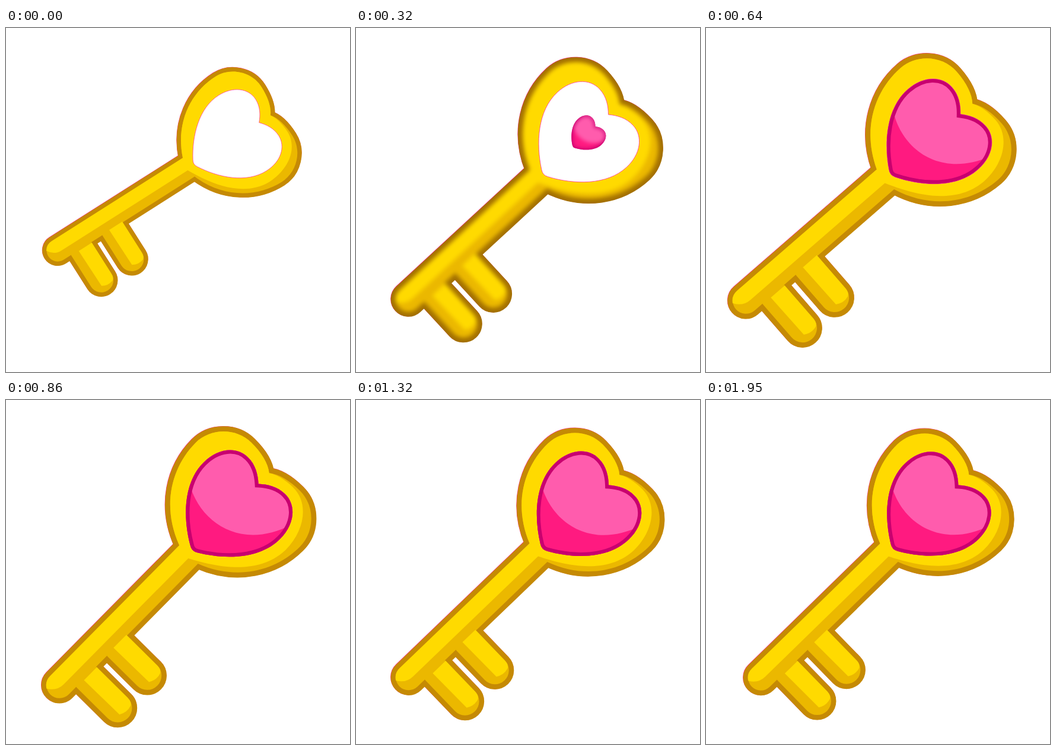
These frames come from a looping animation (580x580 px, 1990 ms). An HTML page:

```html
<!DOCTYPE html>
<html lang="en">
<head>
<meta charset="utf-8">
<title>Heart key</title>
<style>
  html, body { margin: 0; width: 100%; height: 100%; overflow: hidden; background: #fff; }
  svg { display: block; width: 580px; height: 580px; }
</style>
</head>
<body>
<svg viewBox="0 0 580 580">
  <defs>
    <!-- The key lies along the x axis, with its tail end near the origin. -->
    <g id="body">
      <rect x="-25.5" y="-21.5" width="350" height="43" rx="21.5"/>
      <rect x="13" width="47" height="118" rx="23.5"/>
      <rect x="85" width="47" height="115" rx="23.5"/>
      <path d="M298 22C323 87 379 121 436 121C470 121 501 92 501 56C501 32 496 12 486 0
        C496 -12 501 -32 501 -56C501 -92 470 -121 436 -121C379 -121 323 -87 298 -22Z"/>
    </g>
    <path id="heart" d="M310 8C334 49 375 89 422 89C456 89 480 69 480 43C480 25 471 11 461 0
      C471 -11 480 -25 480 -43C480 -69 456 -89 422 -89C375 -89 334 -49 310 -8Q305 0 310 8Z"/>
    <clipPath id="inHeart"><use href="#heart"/></clipPath>
  </defs>
  <g id="key">
    <use href="#body" y="-.6" fill="#ff2a9a" stroke="#ff2a9a" stroke-width="17"/>
    <use id="rim" href="#body" stroke-width="17"/>
    <g id="gold">
      <use href="#body" fill="#ebb800"/>
      <g fill="#ffda00">
        <path d="M330 -21.5H-4A21.5 21.5 0 0 0 -23 -11Q-14 4 2 4H330Z"/>
        <path d="M293 4C312 40 350 106 415 108C462 108 497 80 497 45C497 25 492 8 486 0
          C496 -12 501 -32 501 -56C501 -92 470 -121 436 -121C379 -121 323 -87 298 -22Z"/>
        <path id="glint" d="M30 23H60V94Q60 104 54 107Q42 111 31 104Z"/>
        <use href="#glint" x="72" y="-3"/>
      </g>
    </g>
    <use href="#heart" fill="#fff" stroke="#ff3aa0" stroke-width=".8"
      transform="translate(414 0) scale(.977) translate(-414 0)"/>
    <g id="gem">
      <use href="#heart" fill="#c8006f"/>
      <g clip-path="url(#inHeart)">
        <g id="pink">
          <use href="#heart" fill="#ff1a80"/>
          <path d="M382 -82C347 -22 364 58 452 86L500 100V-100Z" fill="#ff5cad"/>
          <use href="#heart" fill="none" stroke="#c8006f" stroke-width="12"/>
        </g>
      </g>
    </g>
  </g>
</svg>
<script>
const LOOP = 1990, STEP = 1000 / 22, START = 4;
const [key, rim, gold, gem, pink] =
  ['key', 'rim', 'gold', 'gem', 'pink'].map(id => document.getElementById(id));
const { sin, cos, exp, min, max, PI } = Math;
const mix = (a, b, p) => a + (b - a) * p;
const clamp = x => min(1, max(0, x));
const launch = n => ((n - START) / 3) ** 1.5;

// Counterclockwise turn in degrees: a quick launch, then a damped swing.
function turn(n) {
  if (n <= 7) return mix(-11.8, -1.5, launch(n));
  const d = n - 9.4;
  return 4.7 * exp(-0.0715 * d) * cos(2 * PI * d / 11.2) - 0.35;
}

// Size: launch, overshoot, slow settling.
function size(n) {
  if (n <= 7) return mix(0.867, 0.989, launch(n));
  if (n <= 11) return mix(0.989, 1.034, sin(PI / 2 * (n - 7) / 4));
  return 1 + 0.017 * (1 + cos(PI * clamp((n - 11) / 25)));
}

function blur(node, r) {
  node.style.filter = r > 0.05 ? `blur(${r}px)` : 'none';
}

function draw() {
  const t = Math.floor(performance.now() % LOOP / 10) * 10;
  const n = max(START, Math.floor((t + 5) / STEP));
  const grow = 1 - exp(-0.0546 * (n - START) ** 1.83);
  const soft = sin(PI * clamp((n - START) / 8));

  key.setAttribute('transform', `translate(381 193) rotate(${-turn(n)}) scale(${size(n)})
    translate(-286 272) rotate(-44.2)`);
  const rimColor = `rgb(${mix(197, 160, soft)},${mix(138, 110, soft)},${mix(4, 0, soft)})`;
  rim.setAttribute('fill', rimColor);
  rim.setAttribute('stroke', rimColor);
  gem.setAttribute('transform', `translate(414 0) scale(${grow}) translate(-414 0)`);
  blur(gold, 4 * soft);
  blur(pink, 16 * soft * (1 - grow));
  requestAnimationFrame(draw);
}
draw();
</script>
</body>
</html>
```
